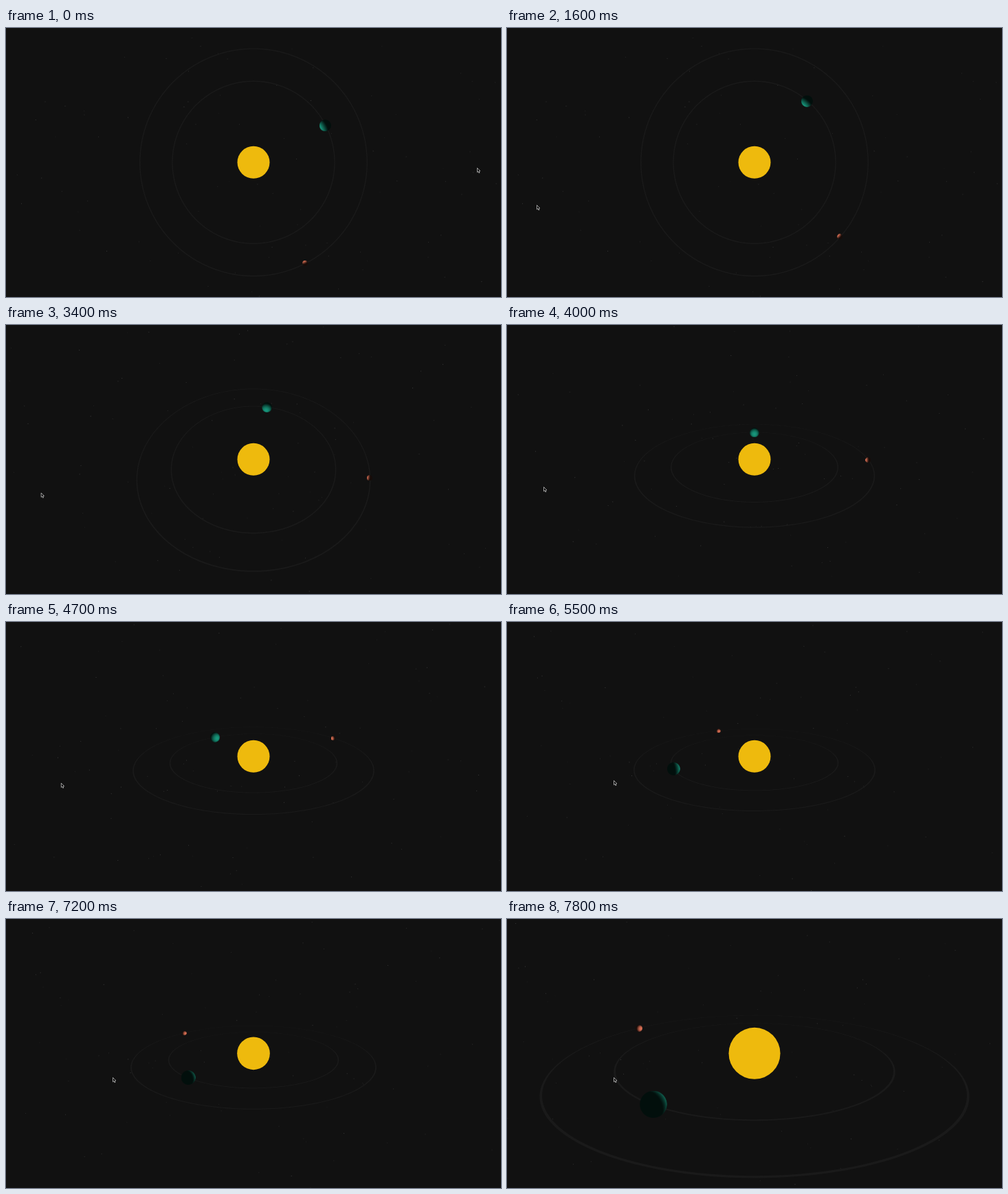
Recreate the animation shown at these times as an HTML page with a canvas. Size 720 by 391 pixels, loop 8000 ms.

```html
<!DOCTYPE html>
<html lang="en">
<head>
<meta charset="utf-8">
<title>Orbits</title>
<style>
html, body { margin: 0; width: 100%; height: 100%; overflow: hidden; background: #111; }
canvas { display: block; }
</style>
</head>
<body>
<canvas id="stage" width="720" height="391"></canvas>
<script>
const W = 720, H = 391, CX = 360, CY = 195.3, FOCAL = 472;
const LOOP = 8000, STEP = 100;
const RAD = Math.PI / 180;
const ctx = document.getElementById('stage').getContext('2d');

const SUN = { radius: 23.5, color: '#eeba0d' };
const PLANETS = [
  { orbit: 117.3, radius: 8.5, start: 27.2, speed: 13.85, color: [24, 152, 125] },
  { orbit: 164.5, radius: 3.9, start: -62.9, speed: 13.65, color: [226, 116, 88] }
];
const RING = { width: 1.4, color: '#1a1a1a' };

// Progress of t from one time to another, 0 to 1
const ramp = (t, from, to) => Math.min(1, Math.max(0, (t - from) / (to - from)));

// The pointer crosses the stage, tilts the view, turns it; then the wheel zooms out and in
function poseAt(t) {
  const cross = ramp(t, 650, 1550), tilt = ramp(t, 2450, 4000), turn = ramp(t, 4450, 5400);
  const out = ramp(t, 5750, 6550), into = ramp(t, 6700, 7750);
  return {
    elevation: 90 - 66 * tilt - 3.5 * ramp(t, 4000, 4150) - 1.8 * turn,
    azimuth: 7.5 * tilt + 94.8 * turn,
    zoom: Math.pow(0.672, out) * Math.pow(2.375, into),
    cursorX: 685 - 642 * cross + 4 * ramp(t, 1600, 2800) + 6 * tilt + 102 * turn,
    cursorY: 203 + 54 * cross - 22 * tilt - 5 * turn
  };
}

function makeCamera({ elevation, azimuth, zoom }) {
  const e = elevation * RAD, a = azimuth * RAD;
  return { s: Math.sin(e), c: Math.cos(e), as: Math.sin(a), ac: Math.cos(a), dist: FOCAL / zoom };
}

// World axes: x right, y up, z away from the viewer
function toView(cam, [x, y, z]) {
  const vx = x * cam.ac - z * cam.as, vz = x * cam.as + z * cam.ac;
  return [vx, vz * cam.s + y * cam.c, cam.dist + vz * cam.c - y * cam.s];
}

function toScreen([x, y, d]) {
  const k = FOCAL / d;
  return [CX + x * k, CY - y * k, k];
}

const onCircle = (r, a) => [r * Math.cos(a), 0, r * Math.sin(a)];

let seed = 41;
function random() {
  seed = (seed * 16807) % 2147483647;
  return seed / 2147483647;
}

const stars = Array.from({ length: 850 }, () => {
  const y = random() * 2 - 1, r = 2300 + random() * 300;
  const [x, , z] = onCircle(r * Math.sqrt(1 - y * y), random() * 2 * Math.PI);
  return { pos: [x, y * r, z], alpha: 0.05 + random() * 0.13 };
});

function drawStars(cam) {
  for (const { pos, alpha } of stars) {
    const v = toView(cam, pos);
    if (v[2] < 1) continue;
    const [x, y] = toScreen(v);
    ctx.fillStyle = `rgba(255,255,255,${alpha})`;
    ctx.fillRect(x - 0.5, y - 0.5, 1, 1);
  }
}

function drawRing(cam, orbit) {
  ctx.beginPath();
  for (const r of [orbit, orbit + RING.width]) {
    for (let i = 0; i < 240; i++) {
      const [x, y] = toScreen(toView(cam, onCircle(r, i * 1.5 * RAD)));
      i ? ctx.lineTo(x, y) : ctx.moveTo(x, y);
    }
    ctx.closePath();
  }
  ctx.fillStyle = RING.color;
  ctx.fill('evenodd');
}

const dot = (a, b) => a[0] * b[0] + a[1] * b[1] + a[2] * b[2];
const unit = a => { const l = Math.hypot(...a); return a.map(v => v / l); };
const reject = (a, b) => { const k = dot(a, b); return a.map((v, i) => v - k * b[i]); };

const SIZE = 80;
const ball = document.createElement('canvas');
ball.width = ball.height = SIZE;
const ballCtx = ball.getContext('2d');
const shade = ballCtx.createImageData(SIZE, SIZE);

// Sphere lit from the sun, rendered in its own small buffer
function drawPlanet(cam, planet, v) {
  const [x, y, k] = toScreen(v);
  const toEye = unit(v.map(n => -n));
  const right = unit(reject([1, 0, 0], toEye));
  const up = unit(reject(reject([0, 1, 0], toEye), right));
  const light = unit([-v[0], -v[1], cam.dist - v[2]]);
  const lx = dot(light, right), ly = dot(light, up), lz = dot(light, toEye);
  const half = SIZE / 2;
  for (let j = 0, o = 0; j < SIZE; j++) {
    for (let i = 0; i < SIZE; i++, o += 4) {
      const nx = (i + 0.5 - half) / half, ny = (half - j - 0.5) / half;
      const rr = nx * nx + ny * ny;
      const nz = Math.sqrt(Math.max(0, 1 - rr));
      const lit = Math.max(0, nx * lx + ny * ly + nz * lz);
      const level = 0.1 + 0.9 * Math.pow(lit, 1.2);
      for (let c = 0; c < 3; c++) shade.data[o + c] = planet.color[c] * level;
      shade.data[o + 3] = 255 * Math.min(1, Math.max(0, (1 - Math.sqrt(rr)) * half));
    }
  }
  ballCtx.putImageData(shade, 0, 0);
  const r = planet.radius * k;
  ctx.imageSmoothingQuality = 'high';
  ctx.drawImage(ball, x - r, y - r, 2 * r, 2 * r);
}

function drawSun(cam) {
  ctx.beginPath();
  ctx.arc(CX, CY, SUN.radius * FOCAL / cam.dist, 0, 2 * Math.PI);
  ctx.fillStyle = SUN.color;
  ctx.fill();
}

const arrow = new Path2D('M0 0V6.2L1.4 5L2.4 7.2L3.4 6.8L2.5 4.6L4.3 4.4Z');

function drawCursor(x, y) {
  ctx.save();
  ctx.translate(x + 0.5, y + 0.5);
  ctx.fillStyle = '#000';
  ctx.fill(arrow);
  ctx.strokeStyle = '#c4c4c4';
  ctx.lineWidth = 0.8;
  ctx.stroke(arrow);
  ctx.restore();
}

function draw(t) {
  const pose = poseAt(t), cam = makeCamera(pose);
  ctx.fillStyle = '#111';
  ctx.fillRect(0, 0, W, H);
  drawStars(cam);
  PLANETS.forEach(p => drawRing(cam, p.orbit));
  const bodies = PLANETS.map(p => {
    const v = toView(cam, onCircle(p.orbit, (p.start + p.speed * t / 1000) * RAD));
    return { depth: v[2], draw: () => drawPlanet(cam, p, v) };
  });
  bodies.push({ depth: cam.dist, draw: () => drawSun(cam) });
  bodies.sort((a, b) => b.depth - a.depth).forEach(b => b.draw());
  drawCursor(pose.cursorX, pose.cursorY);
}

const LAST = LOOP - 2 * STEP;
let shown = -1;
function tick() {
  const t = Math.min(LAST, Math.floor(performance.now() % LOOP / STEP) * STEP);
  if (t !== shown) draw(shown = t);
  requestAnimationFrame(tick);
}
tick();
</script>
</body>
</html>
```
